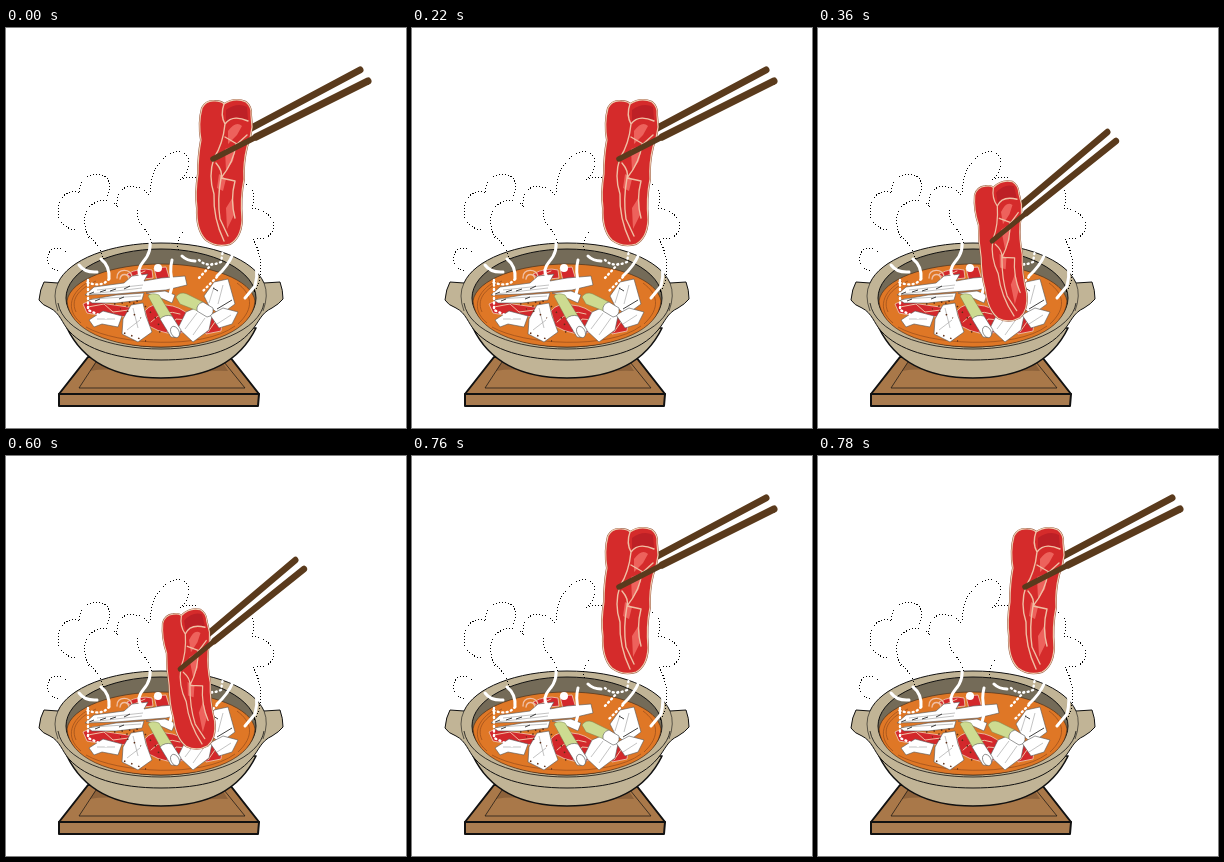
An HTML page for the animation above (0.8 s loop, 400 by 400 pixels).

```html
<!DOCTYPE html>
<html lang="en">
<head>
<meta charset="utf-8">
<title>Hot pot</title>
<style>
html, body { margin: 0; width: 100%; height: 100%; overflow: hidden; background: #fff; }
svg { display: block; width: 100vw; height: 100vh; }
.line { fill: none; stroke: #111; stroke-width: 1; }
.edge { stroke: #111; stroke-width: 1; stroke-linejoin: round; }
.white { fill: #fff; stroke: #555; stroke-width: .6; stroke-linejoin: round; }
.grain { fill: none; stroke: #aaa; stroke-width: .7; }
.fat { fill: none; stroke: #f0bfa4; stroke-width: 1.4; stroke-linecap: round; stroke-linejoin: round; }
.stick { fill: none; stroke: #5a3a1c; stroke-linecap: round; }
.red { fill: #d3282b; stroke: #f0cfba; stroke-width: .8; }
.leek { fill: #cddb91; stroke: #77804f; stroke-width: .5; }
.wisp { fill: none; stroke: #fff; stroke-width: 3; stroke-linecap: round; }
.beads { stroke-width: 2.4; stroke-dasharray: 1 3.5; }
.dots { fill: none; stroke: #000; stroke-width: 1; stroke-dasharray: 1 2; shape-rendering: crispEdges; }
</style>
</head>
<body>
<svg viewBox="0 0 400 400">
  <defs>
    <path id="slice" d="M196 80Q200 72 209 73Q215 73 218 76Q229 69 240 74Q246 79 245 87L246 99Q245 109 241 119Q237 135 238 151Q234 170 236 192Q235 210 224 216Q211 220 200 212Q190 202 191 180Q189 165 192 146Q192 128 195 112Q192 95 196 80Z"/>
  </defs>

  <g id="stand" class="edge" style="stroke-width:2">
    <path fill="#a97849" d="M82 329L53 366H253L224 329Z"/>
    <path fill="#a97c50" d="M53 366H253L252 378H53Z"/>
    <path fill="#8d623b" stroke="none" d="M89 335L84 343Q110 338 155 350Q202 341 222 343L217 335Z"/>
    <path class="line" style="stroke-width:.7" d="M90 334L73 360H239L218 334"/>
  </g>

  <g id="pot">
    <path class="edge" fill="#c1b496" style="stroke-width:1.6" d="M61 300C75 329 103 350 155 350C207 350 236 329 250 300Z"/>
    <path class="edge" fill="#c1b496" d="M52 255C62 232 104 215 155 215C207 215 248 232 258 255L274 254Q277 262 277 271Q273 276 266 280C255 285 253 294 246 302C228 324 195 332 155 332C113 332 80 322 63 303C56 295 54 285 44 280Q36 277 33 272Q34 261 38 254Z"/>
    <path class="line" style="stroke-width:.6" d="M52 255Q46 267 52 283M258 255Q263 267 257 283"/>
    <path class="line" style="stroke-width:.8" d="M52 275C57 304 104 321 155 321C206 321 254 302 258 275"/>
    <ellipse class="edge" fill="#746b58" cx="155" cy="270" rx="95" ry="49"/>
    <path fill="#df7726" stroke="#4d321b" stroke-width=".7" d="M61 273C64 251 108 236 155 236C205 236 246 252 249 273C247 302 205 319 155 319C104 319 63 302 61 273Z"/>
    <path fill="none" stroke="#9f511c" stroke-width=".8" d="M75 295C58 281 65 263 84 253M70 284C63 269 77 259 90 253M232 296C249 280 246 266 231 255M80 299C111 317 197 322 229 298"/>
  </g>

  <g id="food">
    <path class="red" d="M77 276Q88 269 101 276L129 280L126 289L97 288L81 285Z"/>
    <path class="red" d="M121 246Q134 239 146 242L147 250L128 252ZM148 240L160 239L164 252L151 253Z"/>
    <path class="red" d="M139 283Q146 274 160 277Q174 278 184 288L180 304Q161 309 143 298Z"/>
    <path class="red" d="M198 289L217 288L215 303L200 306Z"/>
    <path class="fat" style="stroke-width:1" d="M82 279L98 276L107 284L123 282M126 249L139 243M145 294Q158 280 174 286M161 304L170 291L182 292M202 304L211 291"/>
    <path class="fat" d="M111 250C110 240 126 240 126 249M114 251C115 245 122 245 123 251"/>

    <path class="white" d="M79 267L88 259L118 255L126 248L142 246L138 253L155 250L179 248L181 257L160 262L134 264L110 266Z"/>
    <path class="white" d="M82 272L110 267L138 265L136 272L110 275L86 275Z"/>
    <path class="white" d="M140 265L159 263L169 267L166 275L148 267Z"/>
    <path class="white" d="M83 292L97 283L116 288L112 299L96 296L88 299Z"/>
    <path class="white" d="M117 291L125 277L137 275L140 288L146 304L132 314L116 306Z"/>
    <path class="white" d="M198 268L208 254L222 251L229 276L214 287L203 278Z"/>
    <path class="white" d="M172 300L180 284L194 278L206 288L203 302L187 314Z"/>
    <path class="white" d="M204 287L217 280L232 284L226 296L213 300Z"/>
    <path class="grain" d="M84 266L136 260M86 271L135 268M91 262L137 257M121 302L134 292M127 280L132 300M179 301L191 285M187 307L199 290M208 259L203 275M217 257L212 276M211 296L225 287M91 291L109 291"/>
    <path class="line" style="stroke-width:.8" d="M83 266L88 264M94 264L100 262M104 263L110 261M118 261L124 258M89 273L94 271M113 271L118 269M207 260L212 263M211 281L226 272"/>

    <path class="leek" d="M142 268Q145 264 153 267L166 288Q163 294 155 292Z"/>
    <path class="white" d="M154 291Q159 286 166 288L175 302Q174 311 165 309Z"/>
    <ellipse class="white" cx="169" cy="304" rx="4" ry="6" transform="rotate(-28 169 304)"/>
    <path class="leek" d="M170 269Q174 263 181 266L197 274Q200 280 192 283L174 276Z"/>
    <path class="white" d="M191 283Q190 276 197 274L207 280Q208 288 201 289Z"/>
    <path class="line" style="stroke:#5c2d16;stroke-width:1.5;stroke-dasharray:1.5 6" d="M108 276L133 273L114 281M118 305L140 313M139 278L152 293L154 306M121 283L135 290"/>
    <circle cx="152" cy="240" r="4" fill="#fff"/>
  </g>

  <g id="steam">
    <path class="wisp" d="M73 237Q79 245 91 244M95 231Q104 238 103 251M143 209Q147 223 137 234Q130 242 135 249M166 232Q163 244 167 255L164 266M176 228Q181 233 189 233M227 226Q222 238 211 248M245 222Q254 239 249 258L239 270"/>
    <path class="wisp beads" d="M103 251Q96 260 80 254M82 252L82 282L100 290M193 232Q201 240 215 234L217 222M206 236L193 250M211 249L197 263"/>
    <path class="dots" d="M52 243C42 241 38 229 45 222Q53 218 60 224M69 202C52 199 48 184 56 170Q62 161 74 165C72 153 81 146 91 146Q104 147 104 160Q103 168 98 172M83 210C75 195 78 178 91 174Q102 169 111 178C110 163 119 156 130 159Q140 161 144 169M145 164C143 141 160 123 174 123Q186 128 182 141Q180 148 173 152Q182 148 190 150M240 156Q252 162 246 180C259 181 270 190 267 202Q261 214 250 210M83 208Q95 219 98 232M132 182C128 197 147 203 145 217M177 204Q168 215 174 226M247 211C256 226 258 250 248 264"/>
  </g>

  <g id="lift">
    <path class="stick" stroke-width="7" d="M236 105L354 42"/>
    <use href="#slice" fill="none" stroke="#8b4a34" stroke-width="2"/>
    <use href="#slice" fill="#d52b2b" stroke="#efcdb0" stroke-width="1.2"/>
    <path fill="#bd2026" d="M220 82Q231 74 241 79L242 92L229 89L220 95Z"/>
    <path fill="#ed625c" d="M222 103Q230 92 236 98L231 107L222 116ZM219 121L230 117L227 133L220 143ZM213 146L220 151L217 163L211 160ZM220 180L227 169L228 187L221 201Z"/>
    <path class="fat" d="M218 76Q214 87 219 96Q217 116 208 130Q202 148 208 166Q207 190 218 213M219 96Q226 86 242 93M219 109L231 116L241 107M210 135Q217 143 215 150L229 153Q224 172 229 190M215 150Q211 172 214 191L222 208M230 116Q228 134 215 150"/>
    <path class="stick" stroke-width="5.5" d="M207 131L260 104"/>
    <path class="stick" stroke-width="7" d="M250 109L362 53"/>
  </g>
</svg>
<script>
const lift = document.getElementById('lift');
const dipped = 'matrix(.875 -.173 .15 .938 -26.7 125.9)';
const start = performance.now();

function draw(now) {
  const t = Math.max(0, now - start) % 800;
  lift.setAttribute('transform', t >= 360 && t < 760 ? dipped : '');
  requestAnimationFrame(draw);
}
draw(start);
</script>
</body>
</html>
```
